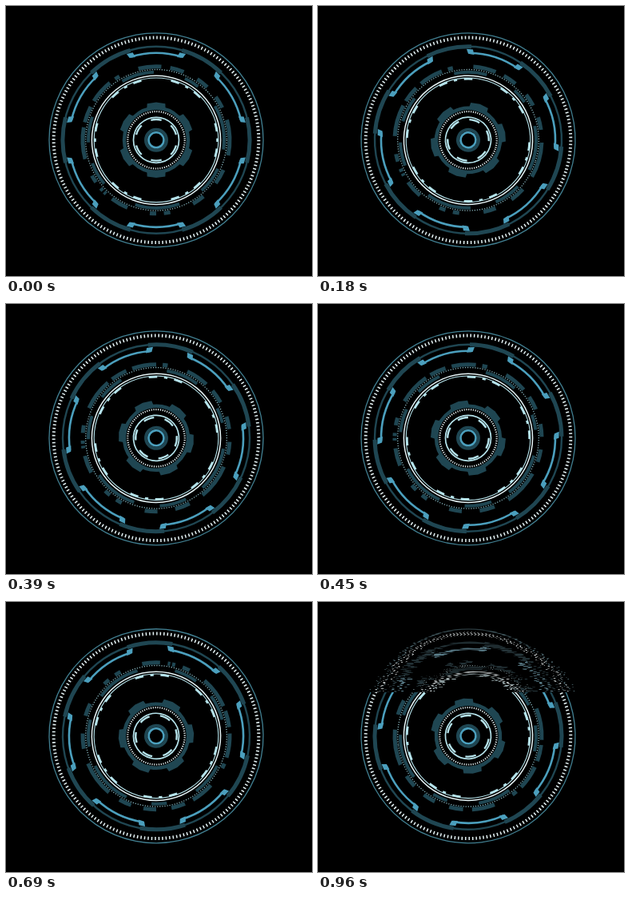
Recreate the animation shown at these times as an HTML page with a canvas. Size 383x338 px, loop 990 ms.

```html
<!DOCTYPE html>
<html>
<head>
<meta charset="utf-8">
<style>
  html, body { margin: 0; width: 100%; height: 100%; overflow: hidden; background: #000; }
  canvas { display: block; }
</style>
</head>
<body>
<canvas id="stage" width="383" height="338"></canvas>
<script>
const W = 383, H = 338, CX = 188, CY = 167.8;
const LOOP = 990, STEP = 30, CUT = 540;
const BLUE = '#4b9fbd', DARK = '#1f4652', PALE = '#b5e3eb', WHITE = '#e4f2f4';
const RIM = '#417f91', DOT = '#86b4bd';
const screen = document.getElementById('stage').getContext('2d');
const dial = document.createElement('canvas');
dial.width = W;
dial.height = H;
const g = dial.getContext('2d');

const rad = deg => deg * Math.PI / 180;

function arc(r, from, to, width, color) {
  g.beginPath();
  g.arc(0, 0, r, rad(from), rad(to));
  g.lineWidth = width;
  g.strokeStyle = color;
  g.stroke();
}

const ring = (r, width, color) => arc(r, 0, 360, width, color);

function ticks(r, count, share, width, color) {
  const pitch = 2 * Math.PI * r / count;
  g.setLineDash([pitch * share, pitch * (1 - share)]);
  ring(r, width, color);
  g.setLineDash([]);
}

function polar(points, color) {
  g.beginPath();
  for (const [r, a] of points) g.lineTo(r * Math.cos(rad(a)), r * Math.sin(rad(a)));
  g.closePath();
  g.fillStyle = color;
  g.fill();
}

const OUTER_BLOCKS = [
  [-104, -86], [-79, -68], [-56, -46], [-36, -26], [-16, 12], [24, 36], [50, 60],
  [79, 84], [90, 95], [113, 127], [133, 135], [136.5, 139], [145, 151],
  [165, 190], [194, 207], [212, 231], [236, 240]
];
const INNER_BLOCKS = [
  [-120, -92], [-65, -52], [-30, 8], [25, 48], [70, 108], [140, 160], [178, 200]
];

function drawSector(a) {
  arc(117, a + 16, a + 44, 5, DARK);

  arc(109, a - 17, a + 17, 2.6, BLUE);
  for (const s of [-1, 1]) {
    polar([[107, a + s * 14], [108, a + s * 18], [114, a + s * 19], [113.5, a + s * 15]], BLUE);
  }

  const nub = a + 30;
  arc(76.6, nub - 1.6, nub + 1.6, 2.8, PALE);
  for (const s of [-12, 12]) arc(76.6, nub + s - 4, nub + s + 4, 2.6, PALE);

  polar([[40, a - 17], [47, a - 14], [47.3, a], [47, a + 14], [40, a + 17]], DARK);
  arc(25.8, a - 15, a + 15, 2.3, PALE);
}

function drawDial(angle) {
  g.setTransform(1, 0, 0, 1, 0, 0);
  g.fillStyle = '#000';
  g.fillRect(0, 0, W, H);
  g.translate(CX, CY);
  g.rotate(rad(angle));

  ring(134, 1.3, RIM);
  ticks(128.3, 180, 0.34, 4, WHITE);
  ring(117, 2.4, DARK);

  for (const [from, to] of OUTER_BLOCKS) arc(92, from, to, 5, DARK);
  for (const [from, to] of INNER_BLOCKS) arc(85, from, to, 4, DARK);
  ticks(88.3, 180, 0.4, 1.3, DOT);
  ring(80.6, 1.5, WHITE);
  ring(77.8, 1.1, PALE);

  ring(40, 4.5, DARK);
  for (let a = -90; a < 270; a += 60) drawSector(a);
  ticks(35.7, 80, 0.42, 2.2, WHITE);
  ring(28.5, 1.7, PALE);
  ring(13, 4, DARK);
  ring(9.5, 2.6, BLUE);
}

function noise(n) {
  const v = Math.sin(n * 127.1 + 11.7) * 43758.5453;
  return v - Math.floor(v);
}

// Shift single rows sideways, more strongly towards the bottom of the band
function tear(bottom, left, right, seed) {
  const top = 32;
  screen.fillStyle = '#000';
  screen.fillRect(0, top, W, bottom - top);
  screen.filter = 'saturate(0.5)';
  for (let y = top; y < bottom; y++) {
    const depth = Math.min(1, (y - top) / 60);
    const shift = Math.round((left + (right - left) * noise(y + seed)) * depth);
    screen.globalAlpha = 0.3 + 0.6 * noise(y * 3 + seed);
    screen.drawImage(dial, 0, y, W, 1, shift, y, W, 1);
  }
  screen.filter = 'none';
  screen.globalAlpha = 1;
}

function frame() {
  const t = Math.floor(performance.now() % LOOP / STEP) * STEP;
  drawDial(t * 0.1 + (t >= CUT ? 77 : 0));
  screen.drawImage(dial, 0, 0);
  if (t === 480 || t === 960) tear(113, -2, 14, t);
  if (t === 510) tear(303, -27, 27, t);
  requestAnimationFrame(frame);
}
frame();
</script>
</body>
</html>
```
